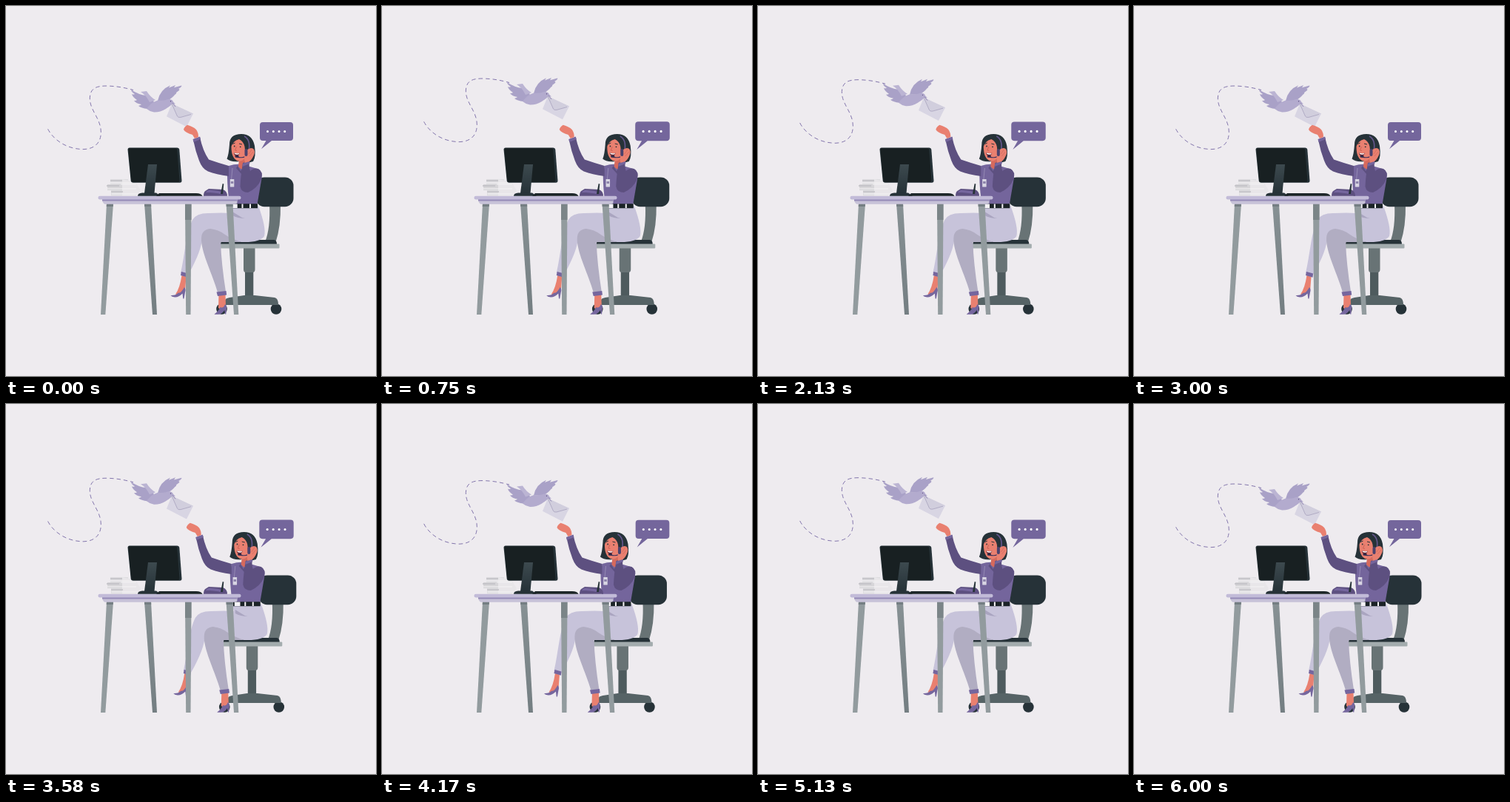
Animation of 500x500 px, one loop 6.04 s. Source, as an HTML page:

```html
<!DOCTYPE html>
<html lang="en">
<head>
<meta charset="utf-8">
<title>Message by dove</title>
<style>
html, body { margin: 0; width: 100%; height: 100%; overflow: hidden; background: #eeebef; }
svg { display: block; width: 100%; height: 100%; }
</style>
</head>
<body>
<svg viewBox="0 0 500 500">
  <defs>
    <linearGradient id="metal" x1="0" y1="0" x2="0" y2="1">
      <stop offset="0" stop-color="#879194"/><stop offset="1" stop-color="#747e82"/>
    </linearGradient>
    <linearGradient id="stand" x1="0" y1="0" x2="0" y2="1">
      <stop offset="0" stop-color="#3d4a4f"/><stop offset="1" stop-color="#263238"/>
    </linearGradient>
  </defs>

  <g id="dove">
    <path d="M56.600 166.300C63 179 80 193.600 105 193.600C123 193 130 181 128 166C126 150 113 140 113.300 124C114 111 122 108 136 108C150 108.300 160 110.300 172 113.500" fill="none" stroke="#7768a4" stroke-width=".9" stroke-dasharray="5.500 4"/>
    <g fill="#a9a1c7">
      <path d="M169 113Q179 120 190 121Q200 125 200 131L191 139Q183 138 179 135Q182 134 183 133Q176 132 173 128Q176 128 177 127Q171 123 170 119Q172 120 174 119Q169 116 169 113Z"/>
      <path d="M182 116L190 115Q195 123 202 127L194 130Q189 120 182 116Z" fill="#bbb4d3"/>
      <path d="M205 128Q208 113 222 107.200L220 110.500L229 107L227 110.300L237 107.500Q238 108 236 110L233 112Q235 112 234 114L230 117Q231 118 228 120Q225 124 218 128Z"/>
      <path d="M190 139Q196 130 205 127.500Q214 128.500 219 126Q225 125.500 226 129.500L229 132.500L225 132.500Q219 137 216 139Q208 143.800 200 143.500Q194 142.500 190 139Z" fill="#b3abce"/>
      <circle cx="222.500" cy="128.700" r=".7" fill="#5d5080"/>
    </g>
    <path d="M224 132L253 145.500L244 163.300L217 149.300Z" fill="#d8d5e3"/>
    <path d="M224 132L231.500 149Q232.500 151 236 150.400L253 145.500Z" fill="#d1cedd"/>
    <path d="M224 132L231.500 149Q232.500 151 236 150.400L250 146.500" fill="none" stroke="#a19bb8" stroke-width=".7"/>
    <path d="M225 131L229 136" stroke="#8d82b0" stroke-width="1"/>
  </g>

  <g id="woman">
    <g id="chair">
      <path d="M356 268H371Q371.500 298 364.500 319H350Q357.500 300 356 268Z" fill="#687375"/>
      <rect x="337.500" y="231.500" width="51" height="39.700" rx="11.500" fill="#263238"/>
      <rect x="323" y="356" width="11.300" height="38" fill="#4e5b5e"/>
      <path d="M321 327H336.500V356Q336.500 360 333 360H324Q321 360 321 356Z" fill="#687375"/>
      <circle cx="291.500" cy="409.500" r="7.300" fill="#263238"/>
      <circle cx="365" cy="409.500" r="7.300" fill="#263238"/>
      <path d="M296 404V398Q296 395 302 394L322 391H336L363 394Q368 395 368 404Z" fill="#566366"/>
      <path d="M290 322Q290 316 296 316H362Q366 316.500 366 322Z" fill="#263238"/>
      <rect x="289" y="321.600" width="80.500" height="5.900" rx="1" fill="#a3acae"/>
    </g>

    <path d="M237.500 364L243.500 366L242 385L235 391L229 389.500Q235 381 237.500 364Z" fill="#e98070"/>
    <path d="M222.500 391Q229 391.500 233 387.500Q236 389 241 380Q243.500 383 242 387L240.500 395.500H239.300L238.500 388.500Q233 394 228 393.500Q224 393 222.500 391Z" fill="#75669e"/>
    <path d="M302 272L341 270Q352 300 349 311Q343 320 318 319L289 315L265 316C263 331 254 350 245 365L236 361C242 336 243 307 252 289Q257 280 273 280Q293 279 304 280Z" fill="#c7c3da"/>
    <path d="M237 359L246 361.500L245.500 366.800L236 364Z" fill="#75669e"/>
    <path d="M287.500 390H296.500L297 405L291 411L287 408Z" fill="#e98070"/>
    <path d="M281.500 416.500Q287 412.500 289.500 407Q294 409 296 403Q299 405 298 409L297.300 416.500H296.200L295.300 411Q291.500 416.800 287 416.800H282Z" fill="#75669e"/>
    <path d="M264 317Q263 302 276 301Q287 302 296 309Q303 314 318 319H290Q291 348 297 386L286 387C279 362 265 336 264 317Z" fill="#b1adc2"/>
    <path d="M284.500 386.500L297.500 385L298.200 390.600L286 392Z" fill="#75669e"/>
    <path d="M306 278L319 286L323 287Q313 287 306 283Z" fill="#aaa5c0"/>

    <path d="M301 216Q310 213 319 214L340 220Q347 223 345.500 233L339.500 268H302Q299 247 299 229Z" fill="#74659c"/>
    <path d="M303 267.300H340V273.300H303Z" fill="#1b2327"/>
    <path d="M305 267.500H312.700V273H305ZM318.500 267.500H320.500V273H318.500ZM329 267.500H331V273H329Z" fill="#f5f3f6"/>
    <path d="M253 181L262 177Q266 196 274 207.500Q287 212 301 216V230Q284 227.500 273 223.500Q265 220 261 209Q256 196 253 181Z" fill="#5d5080"/>
    <path d="M252.500 180L262 176.500L263 180L253.500 184Z" fill="#74659c"/>
    <path d="M255 179L260 177Q260 171 257 167Q253 163 245 160.800Q241 163 240 167Q242 171 252 174Z" fill="#e98070"/>

    <path d="M302 187Q302 173 318 173Q333 173 336 189Q338 204 334 210Q325 213 315 210Q303 211 298.500 206.500Q301 201 302 187Z" fill="#263238"/>
    <path d="M315 207L322.500 204V219Q319 223 314 217Z" fill="#d66a5d"/>
    <path d="M304.500 190Q306 185 311 181.500L315 180Q321 183 322.500 190L324 204Q320 210.500 314 209.500Q304.500 207 304.500 190Z" fill="#e98070"/>
    <path d="M306.500 186.500L309.500 185M315 186L319 187" stroke="#263238" stroke-width="1"/>
    <circle cx="308.700" cy="189.500" r=".9" fill="#263238"/>
    <circle cx="316.700" cy="190.300" r=".9" fill="#263238"/>
    <path d="M311.500 190L309.500 195L312 195.500" fill="none" stroke="#c65b50" stroke-width=".8"/>
    <path d="M308 198Q312 200 316 198.500Q314 204 311 203Q308 202 308 198Z" fill="#6b2530"/>
    <path d="M308.500 198.300Q312 200 315.500 198.700L314.500 200.500Q311 201 309 200Z" fill="#fff"/>
    <path d="M322 176Q331 181 328 196" fill="none" stroke="#65578e" stroke-width="1.600"/>
    <path d="M327 199Q324 207 312 204" fill="none" stroke="#3c335d" stroke-width="1.100"/>
    <rect x="309.500" y="201.800" width="5" height="3" rx="1.500" fill="#302847"/>
    <path d="M313 216L317 223L322 217L325 222L319 228L311 219Z" fill="#5d5080"/>
    <path d="M306 219L304.500 235" stroke="#aaa1c5" stroke-width=".6"/>
    <rect x="302.800" y="234" width="5.500" height="10.500" rx=".6" fill="#d8d5e3"/>
    <path d="M303.800 237H307.300V240H303.800Z" fill="#8c82aa"/>

    <path d="M341 220Q348 224 345 234Q340 246 327 252Q318 252 316.500 244Q317 231 320 212L329 209Q328 217 330 223Q335 218 341 220Z" fill="#5d5080"/>
    <path d="M320 213L329 209.500L329.500 213L319.500 217Z" fill="#74659c"/>
    <path d="M322.500 212Q321 204 324 197Q326 193 331 192Q337 192 335.500 200Q333 207 329 210Z" fill="#e98070"/>
    <rect x="322.500" y="193" width="4" height="10" rx="2" fill="#4b416c"/>
    <path d="M328 200L332 194M329 203L334 197" stroke="#c9645a" stroke-width=".6"/>
  </g>

  <g id="desk">
    <path d="M187 267H196L204 417H198Z" fill="url(#metal)"/>
    <path d="M242 267H250.500L249.500 417H243.200Z" fill="#929b9e"/>
    <path d="M242 267H250.500V289H242Z" fill="#7b8588"/>
    <path d="M136 267H145L134.300 417H128Z" fill="#929b9e"/>
    <path d="M297.500 267H306.500L314.300 417H308Z" fill="#929b9e"/>
    <path d="M136 267H145L144.700 271H135.700ZM187 267H196L196.200 271H187.200ZM297.500 267H306.500L306.700 271H297.700Z" fill="#747e82"/>
    <path d="M130 260H312.500V265.500Q312 267.800 309 267.800H134Q130 267 130 260Z" fill="#c7c2d8"/>
    <rect x="130" y="260.500" width="182" height="3" fill="#968bb8"/>
    <rect x="124.500" y="256.800" width="193" height="4.800" rx="2.300" fill="#c2bbd8"/>

    <g fill="#dedde0">
      <path d="M142 249H176V256.500H142Z"/>
      <path d="M137 241H170V249H137Z" fill="#d6d5d8"/>
      <path d="M141 234H165V241H141Z"/>
      <path d="M157 234L175 238L182 249L176 256.500H157Z" fill="#e8e6e9"/>
      <path d="M141 236H157M136 243H153M142 251H158" stroke="#c0bfc3" stroke-width="1.300"/>
      <path d="M141 239H170M137 247H176M143 254H178M155 241H176" stroke="#f4f3f5" stroke-width="1"/>
    </g>

    <path d="M167 191.500H231.500Q234 191.500 234.300 194L237.500 236Q237.500 238.800 235 238.800H172Q169 238.800 168.700 236L164.500 194Q164.500 191.500 167 191.500Z" fill="#263238"/>
    <path d="M167 192.300H229Q231 192.300 231.200 194L234.500 236Q234.500 238 232.500 238H171.500Q169.500 238 169.200 236L165.300 194.500Q165.300 192.300 167 192.300Z" fill="#182022"/>
    <path d="M192 214H204L200.500 253H187Z" fill="url(#stand)"/>
    <path d="M178 256.800Q178 253 184 252.500H203L209 256.800Z" fill="#263238"/>
    <path d="M203 256.800L207 253H257Q264 253 265.500 256.800Z" fill="#1d2629"/>

    <path d="M267 256.800Q267 251 270 249.500L274 247L293 248Q299 250 299 256.800Z" fill="#5d5080"/>
    <path d="M270 252Q273 247 278 249L287 250Q292 251 291 254L285 253L276 252Z" fill="#75669e"/>
    <path d="M290 254L292.700 240L294.300 240.500L293 254Z" fill="#263238"/>
  </g>

  <g id="bubble">
    <path d="M347 157H384Q388 157 388 161V178Q388 182 384 182H359L345 193.300L351.500 182H347Q343 182 343 178V161Q343 157 347 157Z" fill="#74669c"/>
    <g fill="#fff">
      <circle cx="353.500" cy="169.600" r="1.500"/><circle cx="361.300" cy="169.600" r="1.500"/>
      <circle cx="369" cy="169.600" r="1.500"/><circle cx="376.700" cy="169.600" r="1.500"/>
    </g>
  </g>
</svg>
<script>
const LOOP = 6040, CYCLE = 6000, BEAT = 1500, STEP = 1000 / 24;
const SHAKE = [0, -1, 2, -4, 4, -4, 4, -4, 2, -1, 0];
const [dove, woman, bubble] = ['dove', 'woman', 'bubble'].map(id => document.getElementById(id));

// Both run from 0 up to 1 and back
const triangle = phase => 1 - Math.abs(1 - 2 * phase);
const wave = phase => (1 - Math.cos(2 * Math.PI * phase)) / 2;

function shakeAt(progress) {
  const p = progress * (SHAKE.length - 1);
  const i = Math.min(Math.floor(p), SHAKE.length - 2);
  return SHAKE[i] + (SHAKE[i + 1] - SHAKE[i]) * (p - i);
}

function render(ms) {
  // The motion advances 24 times a second and rests briefly at the end
  const t = Math.min(Math.floor((ms % LOOP + 5) / STEP) * STEP, CYCLE);
  const phase = (t % BEAT) / BEAT;
  dove.setAttribute('transform', `translate(0 ${-10 * triangle(phase)})`);
  woman.setAttribute('transform', `translate(${shakeAt(t / CYCLE)} 0)`);
  bubble.setAttribute('transform',
    `translate(365.5 175) scale(${1 + 0.035 * wave(phase)}) translate(-365.5 -175)`);
}

const start = performance.now();
function tick() {
  render(performance.now() - start);
  requestAnimationFrame(tick);
}
tick();
</script>
</body>
</html>
```
